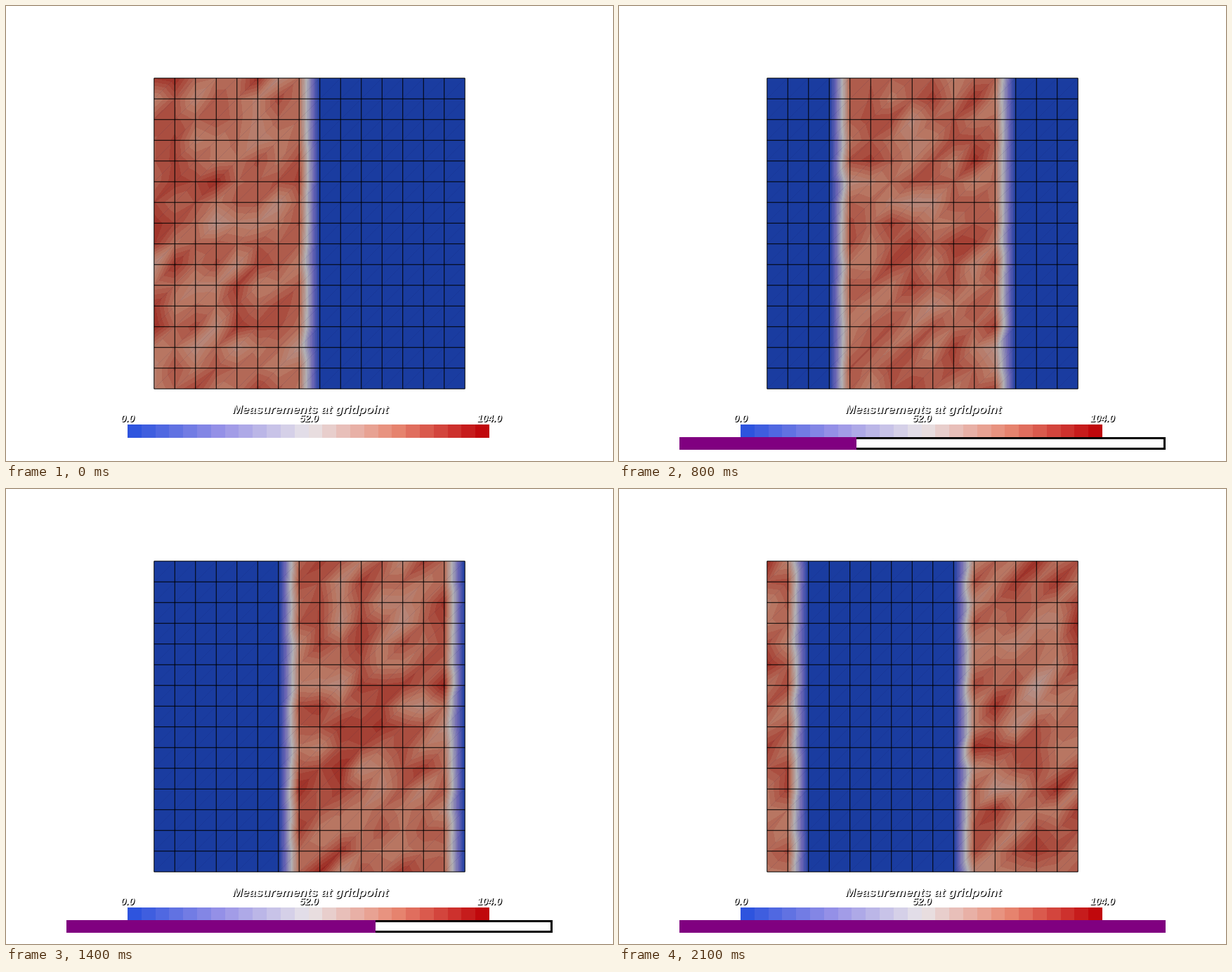
These frames come from a looping animation (864x648 px, 2200 ms). An HTML page with a canvas:

```html
<!DOCTYPE html>
<html lang="en">
<head>
<meta charset="utf-8">
<title>Measurements at gridpoint</title>
<style>
html, body { margin: 0; width: 100%; height: 100%; overflow: hidden; background: #fff; }
#stage { position: absolute; left: 0; top: 0; width: 864px; height: 648px; overflow: hidden; }
canvas { position: absolute; left: 0; top: 0; }
p {
  position: absolute; margin: 0; width: 300px; text-align: center; white-space: nowrap;
  font: italic bold 14px/16px "Liberation Sans", Arial, sans-serif;
  color: #fff; text-shadow: 1px 1px #000;
}
.title { left: 283px; top: 564px; font-size: 17.4px; line-height: 20px; }
.label { top: 579px; }
#bar {
  position: absolute; left: 86px; top: 614px; width: 692px; height: 18px;
  box-sizing: border-box; border: 3px solid #000; background: #fff;
}
#done { position: absolute; left: -3px; top: -3px; height: 18px; background: #800080; }
</style>
</head>
<body>
<div id="stage">
  <canvas id="view" width="864" height="648"></canvas>
  <p class="title">Measurements at gridpoint</p>
  <p class="label" style="left:23px">0.0</p>
  <p class="label" style="left:281px">52.0</p>
  <p class="label" style="left:538px">104.0</p>
  <div id="bar"><div id="done"></div></div>
</div>
<script>
const LOOP = 2200, TICK = 100, STEPS = 11;
const CELLS = 15, POINTS = 16, BAND = 8, PITCH = 29.5;
const LEFT = 210, TOP = 102, INSET = 0.75, SIZE = 445;
const MAX = 104, MEAN = 83, SPREAD = 20, LEVELS = 32;
const KEY = { x: 173, y: 596, width: 515, height: 19, parts: 26 };

// Evenly spaced colour stops from zero to the maximum
const KEY_RAMP = [[46, 84, 222], [152, 146, 231], [232, 228, 232], [232, 136, 114], [192, 8, 12]];
const LIT_RAMP = [[26, 60, 160], [106, 101, 180], [178, 176, 180], [184, 118, 98], [146, 12, 8]];

function blend(ramp, t) {
  const at = t * (ramp.length - 1);
  const k = Math.min(ramp.length - 2, Math.floor(at));
  return ramp[k].map((v, c) => Math.round(v + (ramp[k + 1][c] - v) * (at - k)));
}

const COLOURS = Array.from({ length: LEVELS + 1 }, (_, i) => blend(LIT_RAMP, i / LEVELS));

function randomFrom(seed) {
  return () => {
    seed = (seed + 0x6d2b79f5) | 0;
    let t = Math.imul(seed ^ (seed >>> 15), 1 | seed);
    t = (t + Math.imul(t ^ (t >>> 7), 61 | t)) ^ t;
    return ((t ^ (t >>> 14)) >>> 0) / 4294967296;
  };
}

// An eight-column band of noisy readings moves right and wraps around
function readings(step) {
  const rand = randomFrom(step * 977 + 31);
  const noise = () => MEAN + SPREAD * ((rand() + rand() + rand()) / 1.5 - 1);
  return Array.from({ length: POINTS }, (_, c) => {
    const on = (c - step + POINTS) % POINTS < BAND;
    return Array.from({ length: POINTS }, () => on ? noise() : 0);
  });
}

// Each cell is two triangles split from bottom left to top right
function sample(grid, x, y) {
  const c = Math.min(CELLS - 1, Math.floor(x)), r = Math.min(CELLS - 1, Math.floor(y));
  const u = x - c, w = y - r;
  const tl = grid[c][r], tr = grid[c + 1][r], bl = grid[c][r + 1], br = grid[c + 1][r + 1];
  return u + w < 1
    ? tl + u * (tr - tl) + w * (bl - tl)
    : br + (1 - u) * (bl - br) + (1 - w) * (tr - br);
}

function drawLines(ctx) {
  const end = INSET + CELLS * PITCH;
  ctx.lineWidth = 1;
  ctx.strokeStyle = "rgba(10, 25, 90, .1)";
  ctx.beginPath();
  for (let c = 0; c < CELLS; c++) {
    for (let r = 0; r < CELLS; r++) {
      ctx.moveTo(INSET + c * PITCH, INSET + (r + 1) * PITCH);
      ctx.lineTo(INSET + (c + 1) * PITCH, INSET + r * PITCH);
    }
  }
  ctx.stroke();

  ctx.strokeStyle = "#000";
  ctx.beginPath();
  for (let i = 0; i < POINTS; i++) {
    const at = INSET + i * PITCH;
    ctx.moveTo(at, INSET);
    ctx.lineTo(at, end);
    ctx.moveTo(INSET, at);
    ctx.lineTo(end, at);
  }
  ctx.stroke();
}

function makeSurface(step) {
  const canvas = document.createElement("canvas");
  canvas.width = canvas.height = SIZE;
  const ctx = canvas.getContext("2d");
  const side = Math.floor(CELLS * PITCH);
  const image = ctx.createImageData(side, side);
  const grid = readings(step);
  const place = pixel => (pixel + 1.5 - INSET) / PITCH;
  for (let y = 0, p = 0; y < side; y++) {
    for (let x = 0; x < side; x++, p += 4) {
      const value = sample(grid, Math.min(CELLS, place(x)), Math.min(CELLS, place(y)));
      image.data.set(COLOURS[Math.round(value / MAX * LEVELS)], p);
      image.data[p + 3] = 255;
    }
  }
  ctx.putImageData(image, 1, 1);
  drawLines(ctx);
  return canvas;
}

const view = document.getElementById("view").getContext("2d");
const bar = document.getElementById("bar");
const done = document.getElementById("done");
const surfaces = Array.from({ length: STEPS }, (_, i) => makeSurface(i));

function drawKey() {
  const edge = i => Math.round(KEY.x + i * KEY.width / KEY.parts);
  for (let i = 0; i < KEY.parts; i++) {
    view.fillStyle = `rgb(${blend(KEY_RAMP, i / (KEY.parts - 1))})`;
    view.fillRect(edge(i), KEY.y, edge(i + 1) - edge(i), KEY.height);
  }
}

let shown = -1;
function draw() {
  const tick = Math.floor(performance.now() % LOOP / TICK);
  if (tick !== shown) {
    shown = tick;
    view.clearRect(LEFT, TOP, SIZE, SIZE);
    view.drawImage(surfaces[tick >> 1], LEFT, TOP);
    // The progress bar advances one tick ahead of the surface
    const progress = (tick + 1) >> 1;
    bar.style.display = progress ? "block" : "none";
    done.style.width = Math.round(692 * progress / STEPS) + "px";
  }
  requestAnimationFrame(draw);
}
drawKey();
draw();
</script>
</body>
</html>
```
